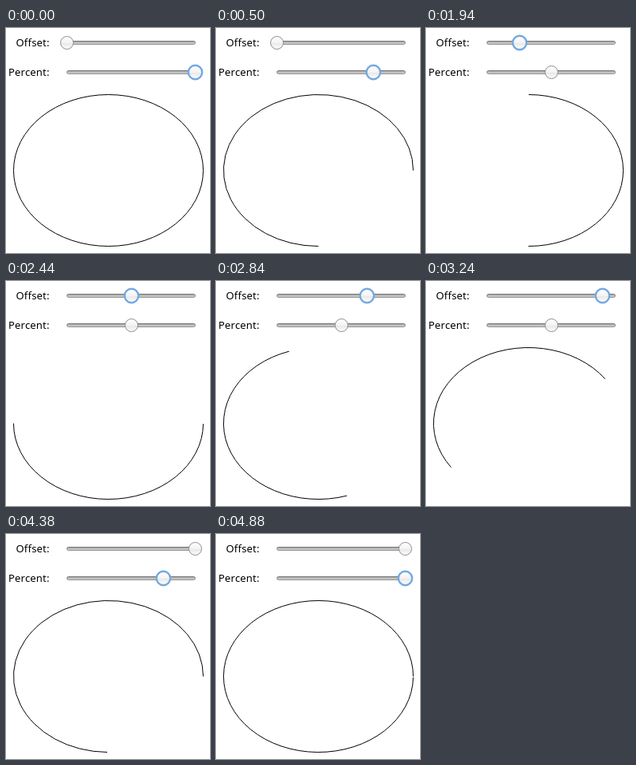
Recreate the animation shown at these times as an HTML page. Size 256 by 282 pixels, loop 5210 ms.

```html
<!DOCTYPE html>
<html lang="en">
<head>
<meta charset="utf-8">
<title>Ellipse offset and percent</title>
<style>
  html, body { margin: 0; width: 100%; height: 100%; overflow: hidden; background: #fff; }
  svg { display: block; }
  text {
    font: 13px "Noto Sans", "Open Sans", sans-serif; font-variant-ligatures: none;
    letter-spacing: .2px; text-anchor: end;
  }
  .knob circle { fill: url(#face); stroke: #8c8c8c; }
  .knob .glow { fill: none; stroke: none; }
  .focus circle { stroke: #6a9fd6; }
  .focus .glow { stroke: #74abe4; stroke-width: 2.6; filter: blur(.6px); }
</style>
</head>
<body>
<svg width="256" height="282">
  <defs>
    <linearGradient id="face" x2="0" y2="1">
      <stop offset="0" stop-color="#fff"/>
      <stop offset=".5" stop-color="#f3f3f3"/>
      <stop offset=".55" stop-color="#e9e9e9"/>
      <stop offset="1" stop-color="#fdfdfd"/>
    </linearGradient>
    <linearGradient id="groove" x2="0" y2="1">
      <stop offset="0" stop-color="#a4a4a4"/>
      <stop offset="1" stop-color="#d4d4d4"/>
    </linearGradient>
    <linearGradient id="rim" x2="0" y2="1">
      <stop offset="0" stop-color="#747474"/>
      <stop offset="1" stop-color="#949494"/>
    </linearGradient>
    <g id="track">
      <rect x="76.5" y="-2" width="161" height="4" rx="2" fill="url(#groove)" stroke="url(#rim)"/>
    </g>
  </defs>
  <text x="54.7" y="23">Offset:</text>
  <text x="54.7" y="60">Percent:</text>
  <use href="#track" y="18.5"/>
  <use href="#track" y="55.5"/>
  <g class="knob" id="offset"><circle class="glow" r="8.6"/><circle r="8"/></g>
  <g class="knob" id="percent"><circle class="glow" r="8.6"/><circle r="8"/></g>
  <path id="arc" fill="none" stroke="#000"/>
</svg>
<script>
const LOOP = 5210;
// Runs of evenly spaced steps: first time, last time, step count
const RUNS = [
  [100, 600, 6], [700, 1000, 4], [1440, 1940, 6], [2030, 2540, 6], [2640, 3140, 6],
  [3240, 3450, 3], [3870, 3870, 1], [3980, 4380, 5], [4480, 4880, 5]
];
const $ = id => document.getElementById(id);
const clamp = (v, lo, hi) => Math.min(hi, Math.max(lo, v));

function stepsAt(t) {
  return RUNS.reduce((sum, [from, to, count]) => {
    if (t < from) return sum;
    if (t >= to) return sum + count;
    return sum + 1 + Math.floor((t - from) / (to - from) * (count - 1));
  }, 0);
}

function point(turn) {
  const a = turn * 2 * Math.PI;
  return `${(128.5 + 119 * Math.cos(a)).toFixed(2)} ${(178.5 - 95 * Math.sin(a)).toFixed(2)}`;
}

function arcPath(start, sweep) {
  const to = turn => `A119 95 0 0 0 ${point(turn)}`;
  return `M${point(start)}` + [1, 2, 3, 4].map(i => to(start + sweep * i / 4)).join('');
}

function setKnob(id, value, y, focused) {
  $(id).setAttribute('transform', `translate(${76.5 + Math.ceil(161 * value)} ${y})`);
  $(id).classList.toggle('focus', focused);
}

function draw(t) {
  const n = stepsAt(t);
  const offset = clamp(n - 11, 0, 20) / 20;
  const percent = (20 - Math.min(n, 10) + Math.max(n - 32, 0)) / 20;
  const onOffset = n >= 11 && n < 32;
  setKnob('offset', offset, 18.5, onOffset);
  setKnob('percent', percent, 55.5, !onOffset);
  // The shifted outline falls slightly short, leaving a hairline gap
  $('arc').setAttribute('d', arcPath(-offset, percent - 0.002 * offset));
}

function tick() {
  draw(performance.now() % LOOP);
  requestAnimationFrame(tick);
}
tick();
</script>
</body>
</html>
```
